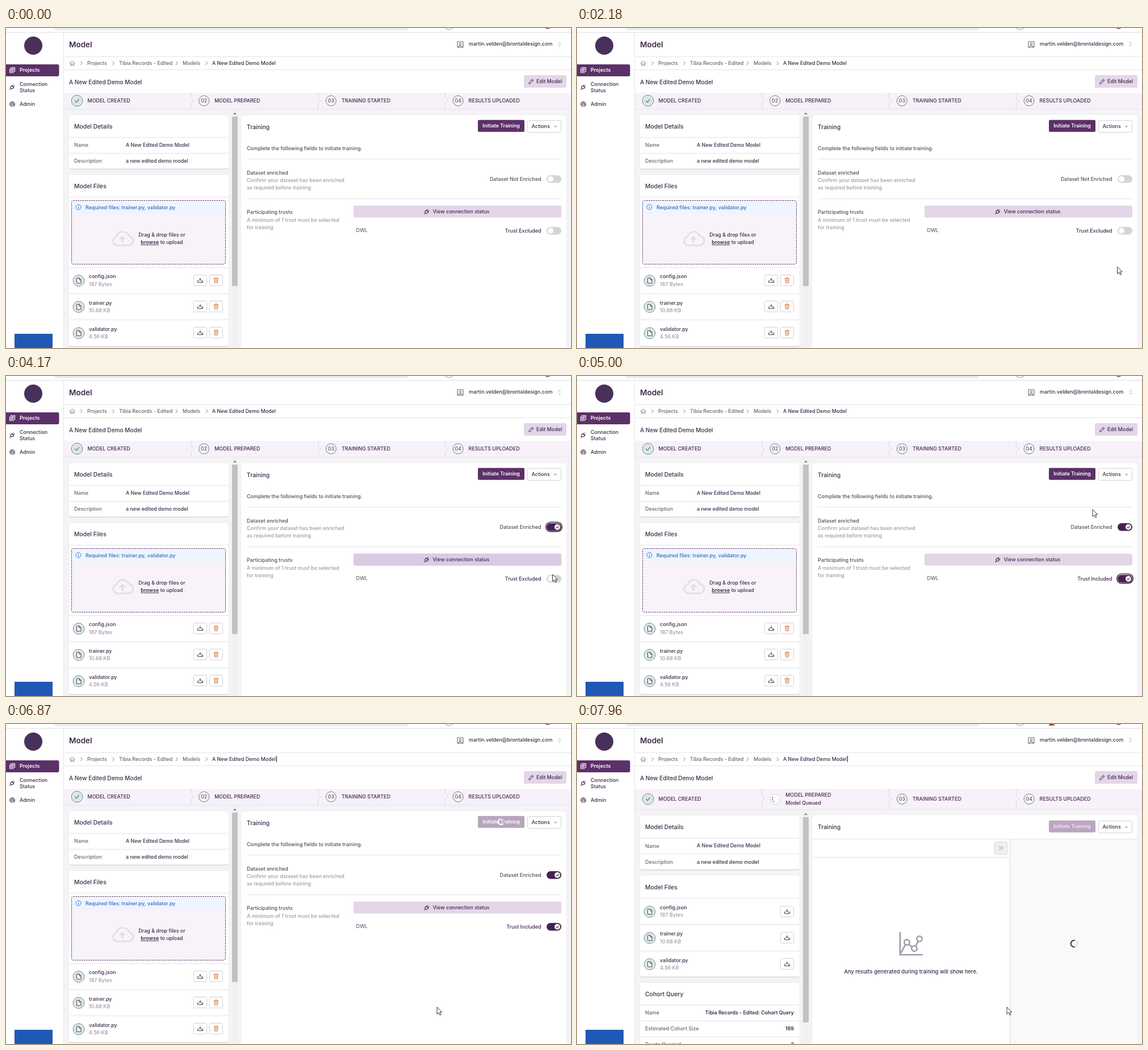
Animation, 995 px wide and 563 px high, one loop 8000 ms. Source, as an HTML page:

```html
<!DOCTYPE html>
<html lang="en">
<head>
<meta charset="utf-8">
<title>Model training</title>
<style>
  html, body { margin: 0; width: 100%; height: 100%; overflow: hidden; background: #fff; }
  svg { display: block; width: 995px; height: 563px; font-family: Inter, sans-serif; }
</style>
</head>
<body>
<svg id="stage" viewBox="0 0 995 563"></svg>
<script>
const LOOP = 8000, QUEUED_AT = 6940;
const PLUM = '#5c3068', DARK = '#452350', INK = '#3e2a49', SOFT = '#544a5c', GREY = '#666570', PALE = '#9b9aa3',
      LINE = '#e4e4e9', LILAC = '#e4d5e9', TEAL = '#4d7f79';

// Markup helpers; text is placed by its vertical centre.
const text = (x, y, s, { size = 8.95, weight = 500, fill = INK, anchor = 'start' } = {}) =>
  `<text x="${x}" y="${y + size * .36}" font-size="${size}" font-weight="${weight}" fill="${fill}" text-anchor="${anchor}">${s}</text>`;
const rect = (x, y, w, h, fill, r = 0, more = '') =>
  `<rect x="${x}" y="${y}" width="${w}" height="${h}" rx="${r}" fill="${fill}" ${more}/>`;
const circle = (x, y, r, fill, more = '') => `<circle cx="${x}" cy="${y}" r="${r}" fill="${fill}" ${more}/>`;
const stroke = (d, color = INK, width = 1, more = '') =>
  `<path d="${d}" fill="none" stroke="${color}" stroke-width="${width}" stroke-linecap="round" stroke-linejoin="round" ${more}/>`;
const hline = (x1, x2, y) => rect(x1, y, x2 - x1, 1, LINE);
const at = (x, y, s) => `<g transform="translate(${x} ${y})">${s}</g>`;
const outlined = (x, y, w, h) => rect(x + .5, y + .5, w - 1, h - 1, '#fff', 2, 'stroke="#d2d2d9"');
const card = (x, y, w, h) =>
  rect(x, y + 1, w, h, '#d3d3da', 4) + rect(x - .5, y - .5, w + 1, h, '#e6e6eb', 4) + rect(x, y, w, h - .5, '#fff', 4);
const spinner = (id, x, y, r, base, color) =>
  at(x, y, circle(0, 0, r, 'none', `stroke="${base}" stroke-width="2.2"`) +
    `<g id="${id}">${stroke(`M0 ${r}A${r} ${r} 0 0 1 0 ${-r}`, color, 2.2)}</g>`);

const plug = stroke('M-2.6-1.2h5.2v1.6a2.6 2.6 0 0 1-5.2 0zM0 3v3M-1.4-1.2v-3M1.4-1.2v-3', INK, 1.1, 'transform="rotate(45)"');
const download = stroke('M0-4V0M-1.8-1.8L0 0L1.8-1.8M-2.5 .8h-2.2v2.8h9.4v-2.8h-2.2M2.5 2.3h.4', INK, .9);
const bin = stroke('M-4-3H4M-1.4-3v-1.5h2.8V-3M-3-3l.4 7.4h5.2L3-3M-1-.8v3M1-.8v3', '#dc7a35', 1);
const badge = circle(0, 0, 9.7, '#fff', `stroke="${TEAL}"`) + circle(0, 0, 8.4, '#dbe6e5');
const fileIcon = badge +
  `<path d="M-3.5-4.5h4.5l3 3v6h-7.5z" fill="#f3f7f7" stroke="${INK}" stroke-width=".9"/>` + stroke('M1-4.5v3h3', INK, .9);

function chrome() {
  const crumb = { fill: GREY }, sep = x => stroke(`M${x} 59l3 3l-3 3`, '#85848d', 1);
  return rect(0, 0, 995, 563, '#fff') +
    rect(83, -12, 627, 16, '#ebebed', 8) + circle(780, -5, 8, '#fff', 'stroke="#c9c9cd" stroke-width="2"') +
    circle(954, -6, 7.5, '#65294c') + rect(0, 7, 995, 1, '#dedee3') +
    rect(101, 8, 1, 555, LINE) +
    circle(48, 31, 16, '#49305a') +
    rect(15, 538, 67, 67, '#2059b5') +
    rect(-4, 64, 97.5, 21, PLUM, 3) +
    at(11, 74, stroke('M-2.5-4.5h7v7h-7zM-4.5-2.5v7h7M-.8-2.5h3.6M-.8-.9h3.6M-.8.7h2', '#fff', 1.1)) +
    text(24, 74, 'Projects', { weight: 600, fill: '#fff' }) +
    at(11, 104, plug) + text(24, 99, 'Connection') + text(24, 110, 'Status') +
    at(11, 134, stroke('M-4.5 1v-1a4.5 4.5 0 0 1 9 0v2M-3 3.5v-3.5a3 3 0 0 1 6 0v3.5M-1.3 4.5v-4.5a1.3 1.3 0 0 1 2.6 0v4.5', INK, .9)) +
    text(24, 134, 'Admin') +
    text(111, 29, 'Model', { size: 13.5, weight: 600 }) +
    at(800, 29, stroke('M-5-5h10v10h-10zM-3 4.5a3 2.5 0 0 1 6 0', GREY, 1.1) + circle(0, -1, 1.7, 'none', `stroke="${GREY}"`)) +
    text(815, 28, 'martin.velden@brontaldesign.com') +
    stroke('M973 27l1.7-2l1.7 2M973 30l1.7 2l1.7-2', '#98979f', .8) +
    hline(102, 995, 50) + hline(102, 995, 73) +
    stroke('M112 62l4.7-4l4.7 4M113.5 61v5h2v-3h2.4v3h2v-5', '#85848d', .9) +
    [131.5, 187.5, 299, 352].map(sep).join('') +
    text(143, 62, 'Projects', crumb) + text(199, 62, 'Tibia Records - Edited', crumb) +
    text(311, 62, 'Models', crumb) + text(363, 62, 'A New Edited Demo Model', { size: 8.8 }) +
    text(111, 95, 'A New Edited Demo Model', { size: 10.1 }) +
    rect(912, 83, 75, 22, LILAC, 2) +
    at(925, 94, stroke('M-4 4l.6-2.6l5.2-5.2l2 2l-5.2 5.2zM.4-2.4l2 2', INK, 1)) +
    text(934, 94, 'Edit Model');
}

function stepper(queued) {
  const height = queued ? 36 : 28, mid = 114 + height / 2;
  const names = ['MODEL CREATED', 'MODEL PREPARED', 'TRAINING STARTED', 'RESULTS UPLOADED'];
  const dots = [150, 195, 240].map(deg => deg * Math.PI / 180)
    .map(a => circle(5 * Math.cos(a), -5 * Math.sin(a), .9, INK)).join('');
  const marker = i => {
    if (i === 0) return badge + stroke('M-3.5 .2l2.4 2.4l4.6-5', '#3d6f69', 1.1);
    if (queued && i === 1) return circle(0, 0, 9, '#fdfbfe', 'stroke="#ddd2e2"') + `<g id="dots">${dots}</g>`;
    return circle(0, 0, 9, '#faf7fb', 'stroke="#77707d"') + text(0, 0, '0' + (i + 1), { fill: '#5d5565', anchor: 'middle' });
  };
  const steps = names.map((name, i) => {
    const x = 125 + i * 223.7, busy = queued && i === 1;
    return at(x, mid, marker(i)) + text(x + 18.5, busy ? 125 : mid, name) +
      (busy ? text(x + 18.5, 138.5, 'Model Queued') : '') +
      (i < 3 ? stroke(`M${x + 201} 114V${mid - 5}l5 5l-5 5V${114 + height}`, '#ddd5e1', 1) : '');
  });
  return rect(102, 114, 893, height, '#f7f2f9') + steps.join('') +
    rect(102, 114 + height, 893, 563, '#f4f4f6') + hline(102, 995, 114 + height);
}

const heading = (x, y, s) => text(x, y, s, { size: 10.4 });

function details(dy) {
  return at(0, dy, card(111, 153, 281, 95) + heading(120, 173, 'Model Details') +
    hline(111, 392, 192) + text(120, 206, 'Name', { fill: GREY }) + text(211, 206, 'A New Edited Demo Model', { size: 8.8 }) +
    hline(111, 392, 220) + text(120, 234, 'Description', { fill: GREY }) + text(211, 234, 'a new edited demo model'));
}

function fileRows(top, removable) {
  return [['config.json', '187 Bytes'], ['trainer.py', '10.68 KB'], ['validator.py', '4.56 KB']].map(([name, size], i) => {
    const y = top + i * 46.2, button = (x, icon) => outlined(x, Math.round(y) - 10, 24, 20) + at(x + 12, Math.round(y), icon);
    return at(128, y + .5, fileIcon) + text(146, y - 6.8, name) + text(146, y + 6.5, size, { fill: PALE }) +
      (removable ? button(330, download) + button(358, bin) : button(358, download)) +
      hline(111, 392, Math.round(y - 23.5));
  }).join('');
}

const scrollbar = (top, bottom) => rect(398, top - 12, 10, 600, '#f1f1f2') + rect(398, top, 10, bottom - top, '#c1c1c2') +
  `<path d="M400 ${top - 4}l3-3.5l3 3.5z" fill="#888"/>`;

const actions = dy => outlined(918, 162 + dy, 60, 22) + text(925.5, 173 + dy, 'Actions') +
  stroke(`M965.5 ${172.5 + dy}l2 2l2-2`, GREY, 1);

const toggle = (id, y, labelColor) => `<g id="${id}">` +
  text(942.5, y, '', { anchor: 'end', fill: labelColor }) +
  rect(950.7, y - 8.3, 28.6, 16.6, '#fff', 8.3, `class="ring" stroke="${DARK}" stroke-width="1.5"`) +
  rect(952, y - 6.5, 26, 13.5, '#d3d3da', 6.8) + rect(952, y - 6.5, 26, 13.5, DARK, 6.8, 'class="on"') +
  `<g class="knob">${circle(959, y + .2, 5, '#fff')}${stroke(`M957 ${y + .3}l1.5 1.6l2.8-3`, DARK, 1.1, 'class="on"')}</g></g>`;

function setupScene() {
  const note = { fill: PALE }, label = { fill: SOFT };
  return stepper(false) + details(0) +
    card(111, 258, 281, 302) + heading(120, 278, 'Model Files') + hline(111, 392, 297) +
    rect(115.5, 303.5, 271, 112, '#f8f3f9', 3) + rect(116.5, 304.5, 269, 23, '#eef5ff', 2) +
    rect(115.5, 303.5, 271, 112, 'none', 3, `stroke="${PLUM}" stroke-dasharray="2.6 1.4"`) +
    circle(127.5, 315, 4.5, 'none', 'stroke="#3c7bd4"') + stroke('M127.5 314.7v2.5M127.5 312.7v.1', '#3c7bd4', 1.1) +
    text(140, 315.5, 'Required files: trainer.py, validator.py', { fill: '#3468c4' }) +
    stroke('M196 382.5a8 8 0 0 1-1-15.8a11 11 0 0 1 21-1a8.4 8.4 0 0 1-1 16.8z', '#e2e0e6', 3) +
    `<path d="M205 365.5l6 6h-4v6h-4v-6h-4z" fill="#e0dee4"/>` +
    text(274.5, 364, 'Drag &amp; drop files or', { anchor: 'middle' }) +
    text(274.5, 377, '<tspan font-weight="600" text-decoration="underline">browse</tspan> to upload', { anchor: 'middle' }) +
    fileRows(444, true) + scrollbar(156, 454) +
    card(414, 153, 573, 440) + heading(424, 174, 'Training') +
    rect(830, 161, 84, 23, '#b48fbe', 3, 'id="buttonRing"') +
    `<g id="button">${rect(831, 161.7, 82, 21, PLUM, 2)}${rect(831, 161.7, 82, 21, '#7d4789', 2, 'id="buttonHover"')}` +
    text(872, 172, 'Initiate Training', { size: 8.8, weight: 600, fill: '#fff', anchor: 'middle' }) + '</g>' +
    `<g id="loading">${spinner('buttonSpin', 872, 172, 5, '#d5c6d9', '#fff')}</g>` + actions(0) +
    text(424, 211.5, 'Complete the following fields to initiate training.', label) + hline(424, 978, 230) +
    text(424, 254.5, 'Dataset enriched', label) + text(424, 268, 'Confirm your dataset has been enriched', note) +
    text(424, 281, 'as required before training', note) + toggle('dataset', 265.5, SOFT) + hline(424, 978, 300) +
    text(424, 324, 'Participating trusts', label) + text(424, 337.5, 'A minimum of 1 trust must be selected', note) +
    text(424, 351, 'for training', note) +
    rect(612, 312.6, 366, 21, LILAC, 2) + rect(612, 312.6, 366, 21, '#dccae2', 2, 'id="statusHover"') +
    at(741, 323, plug) + text(751.5, 322.5, 'View connection status') +
    text(616.5, 356, 'DWL', { fill: GREY }) + toggle('trust', 356.5, INK);
}

function queuedScene() {
  const row = (y, label, value) => text(120, y, label, { fill: GREY }) +
    text(382, y, value, { size: 8.8, weight: 600, anchor: 'end' });
  return rect(831, 0, 10, 3, '#c9774f') + rect(834, 0, 3, 2, '#4a3030') +
    stepper(true) + details(8.3) +
    card(111, 266, 281, 179) + heading(120, 287, 'Model Files') + fileRows(329.7, false) +
    card(111, 455, 281, 140) + heading(120, 475, 'Cohort Query') +
    hline(111, 392, 494) + row(508, 'Name', 'Tibia Records - Edited: Cohort Query') +
    hline(111, 392, 522) + row(536, 'Estimated Cohort Size', '169') +
    hline(111, 392, 550) + row(564, 'Trusts Queried', '2') + scrollbar(164, 525) +
    card(414, 160, 573, 440) + heading(424, 181.5, 'Training') +
    rect(831, 169.7, 82, 21, '#bca5c1', 2) +
    text(872, 180, 'Initiate Training', { size: 8.8, weight: 600, fill: '#efe8f1', anchor: 'middle' }) + actions(8) +
    hline(414, 987, 202) + hline(414, 762, 234) +
    rect(763, 203, 224, 360, '#f9f9fa') + rect(762, 203, 1, 360, '#d9d9df') +
    rect(735.5, 207.5, 22, 22, '#f0f0f3', 2, 'stroke="#d6d6dc"') +
    stroke('M743 215l3.3 3.3l-3.3 3.3M747 215l3.3 3.3l-3.3 3.3', '#85848f', 1) +
    at(588, 386, stroke('M-19-19V20H20M-17 16L-9.5 1.5M-4.5 1L3 7M8.5 5L13.5-5', '#9c9ba8', 2.7) +
      [[-7, -2], [6, 9], [15, -8]].map(([x, y]) => circle(x, y, 4.7, '#fff', 'stroke="#9c9ba8" stroke-width="2.5"')).join('')) +
    text(588, 435.5, 'Any results generated during training will show here.', { size: 9.4, anchor: 'middle' }) +
    spinner('panelSpin', 875.5, 386.5, 5.8, '#dededf', '#49434d');
}

const stage = document.getElementById('stage');
stage.innerHTML = chrome() + `<g id="setup">${setupScene()}</g><g id="queued">${queuedScene()}</g>` +
  rect(476, 56, 1, 11, '#111', 0, 'id="caret"') +
  `<g id="pointer"><path id="arrow" d="M0 0V12.5L3 9.8L5 14.2L7 13.3L5 9H8.8Z" fill="#fff" stroke="#222" stroke-width=".9"/>
   <g id="forbidden">${circle(0, 0, 5, '#fff', 'stroke="#d40d12" stroke-width="2.2"')}${stroke('M-3.4-3.4L3.4 3.4', '#d40d12', 2.2)}</g></g>`;

const el = id => document.getElementById(id);
const show = (id, on) => el(id).setAttribute('visibility', on ? 'inherit' : 'hidden');
const fade = (id, opacity) => el(id).setAttribute('opacity', opacity);
const ramp = (t, start, end) => Math.min(1, Math.max(0, (t - start) / (end - start)));
const spin = (id, t, period) => el(id).setAttribute('transform', `rotate(${(t - 7960) / period * 360})`);

// Pointer path: time, x, y
const path = [[130, 972, 552], [400, 963, 500], [870, 939, 447], [1000, 939, 447], [1490, 954, 416], [1760, 954, 416],
  [2180, 951.5, 420], [2790, 951, 420], [3210, 973, 278], [3350, 975, 268], [3500, 967, 262], [3830, 966, 263],
  [4170, 962.5, 349], [4400, 963, 352], [4580, 962, 351], [5000, 908, 235], [5340, 884, 180], [5610, 883, 178.5],
  [5740, 883, 178.5], [6170, 772, 552], [6300, 768, 552], [6700, 759, 498], [7100, 759, 498], [7500, 757, 498]];

function pointerAt(t) {
  const next = path.findIndex(key => key[0] > t);
  if (next < 0) return path.at(-1).slice(1);
  const a = path[Math.max(0, next - 1)], b = path[next], p = ramp(t, a[0], b[0]);
  return [1, 2].map(i => a[i] + (b[i] - a[i]) * p);
}

function setToggle(id, t, flipAt, ringFrom, ringTo, off, on) {
  const p = ramp(t, flipAt, flipAt + 150), group = el(id);
  group.querySelector('text').textContent = t < flipAt ? off : on;
  group.querySelectorAll('.on').forEach(part => part.setAttribute('opacity', p));
  group.querySelector('.knob').setAttribute('transform', `translate(${12 * p} 0)`);
  group.querySelector('.ring').setAttribute('opacity', t >= ringFrom && t < ringTo ? 1 : 0);
}

function draw(t) {
  const [x, y] = pointerAt(t);
  show('setup', t < QUEUED_AT);
  show('queued', t >= QUEUED_AT);

  setToggle('dataset', t, 3690, 3600, 4420, 'Dataset Not Enriched', 'Dataset Enriched');
  setToggle('trust', t, 4450, 4420, 5480, 'Trust Excluded', 'Trust Included');
  fade('statusHover', ramp(t, 3990, 4080) - ramp(t, 4180, 4330) + ramp(t, 4600, 4690) - ramp(t, 4750, 4880));

  fade('buttonHover', ramp(t, 5270, 5400) - ramp(t, 5700, 5850));
  fade('button', 1 - .57 * ramp(t, 5680, 5830));
  fade('buttonRing', t >= 5480 && t < 5680 ? 1 : 0);
  fade('loading', t >= 5700 ? 1 : 0);
  spin('buttonSpin', t, 1000);
  spin('panelSpin', t, 1000);
  spin('dots', t, 1500);

  show('caret', t >= 5770 && Math.floor((t - 5770) / 530) % 2 === 0);
  const blocked = t >= 5540 && t < 5760;
  fade('pointer', t >= 130 ? 1 : 0);
  show('arrow', !blocked);
  show('forbidden', blocked);
  el('pointer').setAttribute('transform', `translate(${x} ${y})`);
}

const start = performance.now();
function tick() {
  draw((performance.now() - start) % LOOP);
  requestAnimationFrame(tick);
}
tick();
</script>
</body>
</html>
```
